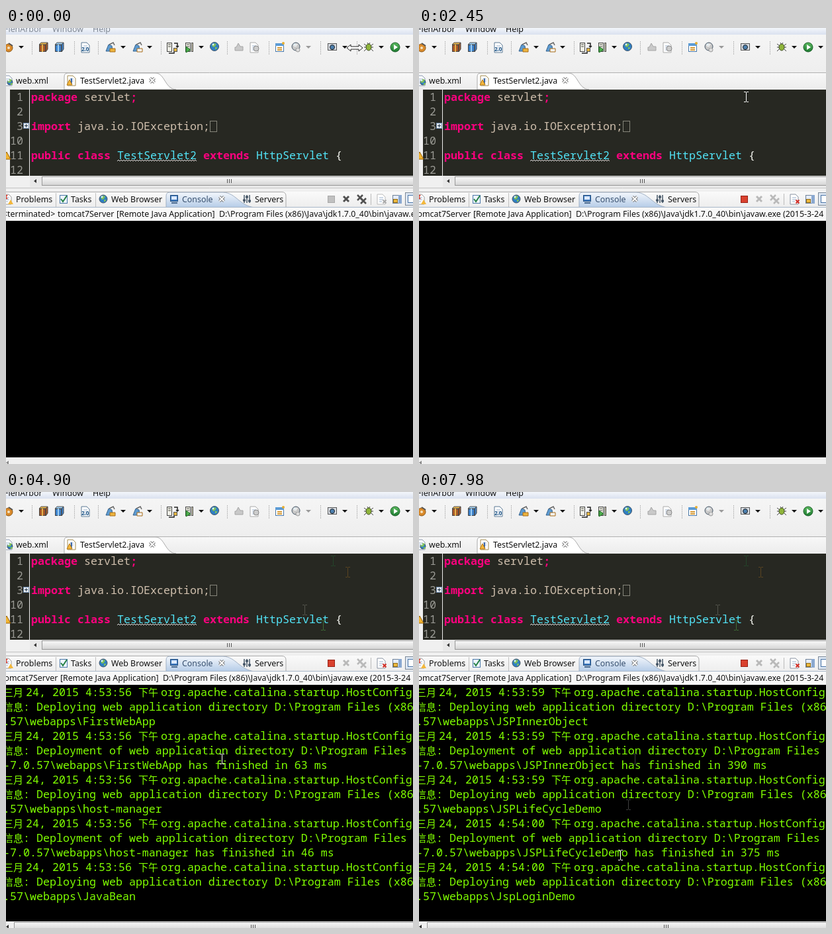
Animation of 615x658 px, one loop 8 s. Source, as an HTML page with a canvas:

```html
<!DOCTYPE html>
<html lang="en">
<head>
<meta charset="utf-8">
<title>IDE server start</title>
<style>
  html, body { margin: 0; width: 100%; height: 100%; overflow: hidden; background: #f0f0f0; }
  canvas { display: block; }
</style>
</head>
<body>
<canvas id="stage" width="615" height="658"></canvas>
<script>
const g = document.getElementById('stage').getContext('2d');
const LOOP = 8000, TICK = 70, ROW = 22;
const UI = '12.4px "Noto Sans", "Open Sans", sans-serif';
const MONO = '16.667px "Noto Sans Mono", "DejaVu Sans Mono", monospace';
const CJK = '15px "Noto Sans CJK SC", "Noto Sans CJK", sans-serif';
const GREEN = '#80ff00';

// drawing helpers
function text(s, x, y, color = '#111', font = UI) {
  g.font = font;
  g.fillStyle = color;
  g.fillText(s, x, y);
}
function box(x, y, w, h, fill, stroke) {
  if (fill) { g.fillStyle = fill; g.fillRect(x, y, w, h); }
  if (stroke) { g.strokeStyle = stroke; g.lineWidth = 1; g.strokeRect(x + .5, y + .5, w - 1, h - 1); }
}
function path(d, fill, stroke, width = 1) {
  const p = new Path2D(d);
  if (fill) { g.fillStyle = fill; g.fill(p); }
  if (stroke) { g.strokeStyle = stroke; g.lineWidth = width; g.stroke(p); }
}
function dot(x, y, r, fill, stroke) {
  g.beginPath();
  g.arc(x, y, r, 0, 7);
  if (fill) { g.fillStyle = fill; g.fill(); }
  if (stroke) { g.strokeStyle = stroke; g.lineWidth = 1; g.stroke(); }
}
function fade(y0, y1, ...colors) {
  const grad = g.createLinearGradient(0, y0, 0, y1);
  colors.forEach((c, i) => grad.addColorStop(i / (colors.length - 1), c));
  return grad;
}
function at(x, y, draw) {
  g.save();
  g.translate(x, y);
  draw();
  g.restore();
}

// icons, drawn around their centre
const cross = (x, y, r, color, w = 3) =>
  path(`M${x - r} ${y - r}L${x + r} ${y + r}M${x + r} ${y - r}L${x - r} ${y + r}`, null, color, w);
const drop = (x, color = '#111') => path(`M${x - 4} 27h8l-4 4z`, color);
const page = (x, y, edge = '#8a98b0') => {
  path(`M${x - 6} ${y - 7}h8l4 4v11h-12z`, '#fff', edge);
  path(`M${x - 3} ${y - 2}h6m-6 3h6m-6 3h4`, null, '#9ab0cc');
};
const globe = (x, y, r = 6, main = '#2f7fc4', land = '#7fc05a') => {
  dot(x, y, r, main, '#456');
  path(`M${x - 4} ${y - 2}l3-3 4 1-2 4-3 1zM${x + 1} ${y + 1}l3 0-1 3-2 0z`, land);
  dot(x - 2, y - 3, 1.4, '#dff0ff');
};
const parcel = (x, front, top) => {
  path(`M${x - 7} 25l3-3h10l-3 3z`, top, '#555');
  box(x - 7, 25, 10, 11, front, '#444');
  path(`M${x + 3} 25l3-3v10l-3 4z`, front, '#444');
  path(`M${x - 2} 25v11`, null, top, 2);
};
const server = (x, edge = '#444') => {
  box(x - 7, 22, 8, 14, '#f4f4e8', edge);
  path(`M${x - 5} 25h4m-4 3h4`, null, edge);
};
const deploy = (x, cap) => {
  path(`M${x - 7} 35l4-10 5 2 1 8z`, '#5e9bd1', '#36648f');
  path(`M${x - 1} 31h8v5h-8z`, cap, '#a86d18');
  path(`M${x - 2} 25l6-3 2 4`, null, '#666', 1.5);
};
const bug = (x, y) => {
  path(`M${x - 7} ${y - 5}l4 3m10-3l-4 3M${x - 7} ${y}h14M${x - 7} ${y + 6}l4-4m10 4l-4-4M${x - 2} ${y - 7}l2 3 2-3`, null, '#444');
  at(x, y, () => { g.scale(.8, 1); dot(0, 0, 5, '#8fb43b', '#33411b'); });
};

function toolbar(active, hover) {
  box(0, 0, 615, 10, fade(0, 10, '#f3f6fb', '#dae1ef'));
  box(0, 10, 615, 58, fade(10, 68, '#f5f5f5', '#eeeeee'));
  const menu = active ? '#111' : '#808894';
  text('FlenArbor', -3, 6, menu);
  text('Window', 70, 6, menu);
  text('Help', 131, 6, menu);

  for (const x of [39, 103, 139, 234, 334, 397, 475, 530])
    for (let y = 20; y < 40; y += 3) box(x, y, 1, 2, '#b5b5b5');

  if (hover) {
    box(264, 19, 39, 21, fade(19, 40, '#fff', '#e8e8e8'), '#9a9a9a');
    box(286, 20, 1, 19, '#aaa');
  }
  dot(4, 30, 6, '#d98a2b', '#8a5514');
  dot(4, 30, 2, '#f4e2c0');
  path('M4 23l6 4', null, '#555', 2);
  parcel(57, '#a7592a', '#e6b24a');
  parcel(81, '#3f83cc', '#9fd0f4');
  page(120, 29, '#5a7894');
  text('2.0', 114, 35, '#1e5688', 'bold 8px "Noto Sans", sans-serif');
  deploy(158, '#edb43e');
  deploy(199, '#f4f4f4');
  server(250);
  path('M254 23h5v6m-2-2l2 2 2-2M246 38h8v-3', null, '#222', 1.5);
  box(253, 30, 6, 6, '#e4b440', '#555');
  server(278);
  path('M272 28l7 5-7 4z', '#4cad4c', '#1f6a24');
  box(280, 22, 3, 14, '#d9d4b8', '#555');
  globe(315, 28, 6.5);
  path('M346 34h12v-6h-4l-3-5-3 6h-2z', '#c9c9c9', '#a5a5a5');
  page(375, 29, '#aaa');
  dot(378, 31, 4, '#ccc', '#888');
  box(407, 23, 13, 13, '#fff', '#4a78a8');
  box(407, 23, 13, 4, '#5b9bd5');
  path('M410 30h7m-7 3h7', null, '#d69a35', 2);
  dot(419, 23, 2, '#e6ad32');
  globe(438, 28, 6, '#c6c6c6', '#e6e6e6');
  dot(441, 33, 3, '#ddd', '#999');
  box(486, 23, 14, 11, '#d8dde4', '#555');
  dot(493, 29, 3.5, '#4c7fae', '#222');
  bug(548, 29);
  dot(588, 29, 7, fade(22, 36, '#5cba60', '#1c7a30'), '#175c25');
  path('M586 25l6 4-6 4z', '#fff');
  for (const x of [23, 177, 217, 295, 512, 567, 607]) drop(x);
  drop(457, '#999');
}

function editor() {
  box(0, 67, 615, 26, fade(67, 93, '#f8f8f8', '#ececec'));
  path('M0 67.5H615', null, '#b0b0b0');
  path('M88 93V74q0-6 5-6H226C240 68 240 92 257 93z', '#fff', '#a8a8a8');
  page(3, 79);
  globe(6, 82, 4);
  text('web.xml', 15, 84);
  page(99, 79, '#a38b4f');
  text('J', 97, 84, '#1d4f9a', 'bold 11px "Noto Sans", sans-serif');
  path('M92 86l4-8 4 8z', '#f5b83c', '#b77a12');
  text('TestServlet2.java', 112, 84);
  closeMark(221, 79);

  box(0, 93, 615, 130, '#272822');
  box(0, 93, 6, 130, '#f0f0f0');
  box(35, 93, 1, 130, '#eee');
  const pink = '#ff007f', plain = '#cfbfad', cyan = '#52e3f6';
  const code = (row, parts) => {
    let col = 0;
    for (const [s, color] of parts) {
      text(s, 38 + col * 10, 110 + row * ROW, color, (color === pink ? 'bold ' : '') + MONO);
      col += s.length;
    }
  };
  ['1', '2', '3', '10', '11', '12'].forEach((n, i) =>
    text(n, 26 - n.length * 10, 110 + i * ROW, '#9a9a94', MONO));
  code(0, [['package', pink], [' servlet', plain], [';', pink]]);
  code(2, [['import', pink], [' java.io.IOException;', plain]]);
  code(4, [['public class ', pink], ['TestServlet2', cyan], [' ', plain], ['extends ', pink], ['HttpServlet', cyan], [' {', '#f9faf4']]);
  path('M168 201' + 'l2-2l2 2'.repeat(30), null, '#ddd');
  box(308, 140, 11, 17, null, '#85857a');
  box(26, 143, 9, 9, '#e8f0fa', '#6a86a8');
  path('M28 147.5h5m-2.5-2.5v5', null, '#234');
  path('M-5 198l6-11 6 11z', '#f2b431', '#946310');

  box(0, 223, 615, 24, '#f0f0f0');
  box(36, 223, 579, 17, '#e8e8e8');
  path('M46 228v6l-4-3z', '#333');
  box(54, 224, 570, 14, fade(224, 238, '#fafafa', '#e7e7e7', '#d2d2d2'), '#999');
  grip(337, 228, 6);
  path('M0 241.5H615', null, '#c2c2c2');
}
const grip = (x, y, h) => { for (const d of [-3, 0, 3]) box(x + d, y, 1, h, '#555'); };
const closeMark = (x, y) => {
  cross(x, y, 3.5, '#777', 4);
  cross(x, y, 3.5, '#fff', 2);
};

function consoleHead(titleLive, iconsLive) {
  box(0, 247, 615, 24, fade(247, 271, '#fafafa', '#ededed'));
  path('M0 247.5H417q6 0 6 6V270', null, '#aaa');
  path('M75.5 249V270M135.5 249V270', null, '#c0c0c0');
  path('M242 271V254q0-6 5-6H328C348 249 352 268 376 271z', fade(248, 271, '#f3f7fc', '#b4cbe7'), '#a0b0c4');
  path('M0 270.5H615', null, '#a9b8ca');

  page(2, 258, '#999');
  cross(-1, 255, 3, '#d64235', 2);
  path('M3 266l4-7 4 7z', '#f3b83b');
  text('Problems', 15, 263);
  box(81, 252, 12, 13, '#eef5ff', '#4c79aa');
  path('M83 258l3 4 6-9', null, '#258045', 2);
  text('Tasks', 98, 263);
  globe(147, 258);
  text('Web Browser', 159, 263);
  box(248, 252, 12, 10, '#3d78bd', '#27517f');
  box(250, 254, 8, 5, '#dceaff');
  box(250, 263, 9, 2, '#49698e');
  text('Console', 266, 263, '#38506f');
  closeMark(326, 258);
  path('M360 252v12m4-12v12m4-12v12', null, '#456', 1.5);
  path('M358 260h4m0-5h4m0 6h4', null, '#456', 3);
  text('Servers', 376, 263);

  const dark = iconsLive ? '#b9b9b9' : '#505050';
  box(486, 253, 11, 11, iconsLive ? '#d9412e' : '#c0c0c0', iconsLive ? '#972216' : '#a8a8a8');
  cross(514, 258, 4, dark);
  cross(535, 256, 4, dark, 2.5);
  cross(540, 261, 4, dark, 2.5);
  box(551, 250, 1, 17, '#bbb');
  page(567, 258, iconsLive ? '#8b94a3' : '#bbb');
  cross(572, 262, 2.5, iconsLive ? '#d33028' : '#aaa', 2);
  box(584, 252, 14, 13, '#e6edf8', '#6f8299');
  box(593, 252, 5, 13, '#8aa8d0');
  box(585, 258, 7, 6, '#edb93d', '#8f6b1a');
  box(603, 248, 20, 20, '#dce6f2', '#7b8796');
  box(607, 252, 12, 12, '#fff', '#4873a6');

  box(0, 271, 615, 20, '#f8f8f8');
  const x = titleLive ? -7 : 78;
  if (!titleLive) text('<terminated>', -5, 285);
  text('tomcat7Server', x, 285);
  text('[Remote Java Application]', x + 89, 285);
  text('D:\\Program Files (x86)\\Java\\jdk1.7.0_40\\bin\\javaw.exe (2015-3-24 下午4:53:53)', x + 244, 285);
}

// console log: { time, from } is a header row, { info } a message, a string a wrapped rest
const head = (time, from) => ({ time, from });
const info = s => ({ info: s });
const tomcat = 'org.apache.catalina.', host = tomcat + 'startup.HostConfig deployDirectory';
const folder = 'web application directory D:\\Program Files (x86)\\apache-tomcat';
const start = (time, app) => [head(time, host), info(`Deploying ${folder}-7.0`), `.57\\webapps\\${app}`];
const done = (time, app, ms) =>
  [head(time, host), info(`Deployment of ${folder}`), `-7.0.57\\webapps\\${app} has finished in ${ms} ms`];
const protocol = name =>
  [head('53:54', 'org.apache.coyote.AbstractProtocol init'), info(`Initializing ProtocolHandler ["${name}"]`)];
const log = [
  head('53:54', tomcat + 'core.AprLifecycleListener init'),
  info('The APR based Apache Tomcat Native library which allows optimal performance '),
  'in production environments was not found on the java.library.path: D:\\Program Fi',
  'les (x86)\\Java\\jdk1.7.0_40\\bin;D:\\Program Files (x86)\\apache-tomcat-7.0.57\\bin',
  ...protocol('http-bio-8080'), ...protocol('ajp-bio-8009'),
  head('53:54', tomcat + 'startup.Catalina load'), info('Initialization processed in 605 ms'),
  head('53:54', tomcat + 'core.StandardService startInternal'), info('Starting service Catalina'),
  head('53:54', tomcat + 'core.StandardEngine startInternal'), info('Starting Servlet Engine: Apache Tomcat/7.0.57'),
  ...start('53:55', 'CookieDemo'), ...done('53:55', 'CookieDemo', 406),
  ...start('53:55', 'docs'), ...done('53:55', 'docs', 47),
  ...start('53:55', 'examples'), ...done('53:56', 'examples', 328),
  ...start('53:56', 'FirstWebApp'), ...done('53:56', 'FirstWebApp', 63),
  ...start('53:56', 'host-manager'), ...done('53:56', 'host-manager', 46),
  ...start('53:56', 'JavaBean'),
  head('53:57', 'com.sun.faces.config.ConfigureListener contextInitialized'),
  info("Initializing Sun's JavaServer Faces implementation (1.2_04-b20-p03) for cont"),
  "ext '/JavaBean'",
  head('53:58', 'com.sun.faces.spi.InjectionProviderFactory createInstance'),
  info('JSF1048: PostConstruct/PreDestroy annotations present.  ManagedBeans methods'),
  ' marked with these annotations will have said annotations processed.',
  ...done('53:58', 'JavaBean', 2246),
  ...start('53:59', 'JSPInnerObject'), ...done('53:59', 'JSPInnerObject', 390),
  ...start('53:59', 'JSPLifeCycleDemo'), ...done('54:00', 'JSPLifeCycleDemo', 375),
  ...start('54:00', 'JspLoginDemo')
];

// [time, first visible row, rows printed]; scrolling lags one tick behind printing
const prints = [
  [0, 0, 0], [3430, 0, 4], [3570, 0, 8], [3710, 0, 12], [3850, 0, 17], [3920, 2, 17],
  [4060, 2, 23], [4130, 8, 23], [4340, 8, 29], [4410, 14, 29], [4830, 14, 47], [4900, 32, 47],
  [5670, 32, 50], [5740, 35, 50], [6160, 35, 53], [6230, 38, 53], [6510, 44, 59],
  [6860, 44, 65], [6930, 50, 65], [7210, 50, 68], [7280, 53, 68], [7560, 53, 71], [7630, 56, 71]
];

function consoleBody(t) {
  const [, top, count] = prints.filter(p => p[0] <= t).pop();
  box(0, 291, 615, 357, '#000');
  g.save();
  g.beginPath();
  g.rect(0, 291, 615, 357);
  g.clip();
  log.slice(top, Math.min(count, top + 17)).forEach((row, i) => {
    const y = 308 + i * ROW;
    const mono = (s, x) => text(s, x, y, GREEN, MONO);
    const han = (s, x) => text(s, x, y, GREEN, CJK);
    if (row.time) {
      han('三月', -4);
      mono('24, 2015 4:' + row.time, 30);
      han('下午', 200);
      mono(row.from, 234);
    } else if (row.info) {
      han('信息', -4);
      mono(': ' + row.info, 26);
    } else mono(row, -4);
  });
  g.restore();

  box(0, 648, 615, 10, '#f0f0f0');
  path('M4 653v6l-4-3z', count ? '#333' : '#888');
  if (count) {
    box(12, 649, 610, 14, fade(649, 663, '#fafafa', '#e4e4e4', '#d0d0d0'), '#999');
    grip(373, 653, 5);
  }
}

// menus
function panel(x, y, w, h) {
  box(x + 3, y + 3, w, h, 'rgba(0,0,0,.35)');
  box(x, y, w, h, '#f1f1f1', '#979797');
  box(x + 27, y + 2, 1, h - 4, '#dcdcdc');
}
const glow = (x, y, w) => box(x, y, w, 21, fade(y, y + 21, '#edf4fc', '#d3e5f8'), '#a9cbee');

function menus(t) {
  if (t < 1120 || t >= 2170) return;
  g.save();
  g.globalAlpha = t < 1190 ? .4 : 1;
  panel(264, 43, 213, 128);
  if (t >= 1470) glow(267, 88, 207);
  const off = '#a3a3a3', on = '#111';
  [['FlenArbor Bromy', 54, off], ['FlenArbor Lorvet', 76, off], ['Lorvet  7.x', 98, on]].forEach(([s, y, color]) => {
    text(s, 299, y + 4, color);
    path(`M461 ${y - 4}v7l4-3.5z`, color);
    dot(278, y, 5.5, color === on ? '#c99a45' : '#c4c4c4');
  });
  box(293, 112, 181, 1, '#d0d0d0');
  box(293, 143, 181, 1, '#d0d0d0');
  text('Configure Server', 299, 132);
  text('Manage Deployments...', 299, 162);
  at(0, 99, () => { server(279); dot(282, 25, 3, '#e0a43b'); });
  at(0, 129, () => { server(277); box(280, 30, 6, 6, '#e4b440', '#555'); });
  if (t >= 1680) {
    panel(475, 87, 112, 48);
    if (t >= 1890) glow(478, 89, 106);
    text('Start', 509, 104);
    text('Stop', 509, 126, off);
    path('M485 95l8 5-8 5z', '#3fa34b');
  }
  g.restore();
}

// pointer
const moves = [
  [70, 527, 30], [420, 440, 46], [700, 340, 44], [910, 297, 28], [1190, 297, 28], [1540, 380, 100],
  [1890, 479, 104], [2030, 492, 103], [2100, 492, 103], [2170, 494, 104], [2940, 494, 104],
  [3220, 451, 178], [3780, 305, 447], [4060, 305, 447], [4480, 326, 403], [7490, 326, 403],
  [7770, 316, 472], [7980, 304, 548]
];
function pointerAt(t) {
  const next = moves.findIndex(m => m[0] >= t);
  if (next < 1) return moves[0].slice(1);
  const [t0, x0, y0] = moves[next - 1], [t1, x1, y1] = moves[next];
  const k = (t - t0) / (t1 - t0);
  return [Math.round(x0 + (x1 - x0) * k), Math.round(y0 + (y1 - y0) * k)];
}
const beam = (x, y, color) =>
  path(`M${x - 3} ${y - 7.5}h3m1 0h3M${x + .5} ${y - 7}v14M${x - 3} ${y + 7.5}h3m1 0h3`, null, color);

function pointer(t) {
  // faint marks the pointer leaves behind
  const marks = [[3850, 451, 178, '#54554c'], [3850, 479, 201, '#3d6b35'], [3850, 494, 104, '#24452a'],
    [3850, 516, 121, '#5a4420'], [7630, 326, 403, '#3c3c3c'], [7840, 316, 472, '#3c3c3c']];
  for (const [from, x, y, color] of marks) if (t >= from) beam(x, y, color);

  const [x, y] = pointerAt(t);
  if (t < 140) {
    at(x, y, () => path('M-12 0l6-5v3h12v-3l6 5-6 5v-3h-12v3z', '#fff', '#222'));
  } else if (t < 2170 || (y > 222 && y < 291)) {
    at(x, y, () => path('M.5 .5v16l4-4 3 6.500 2.500-1-3-6.500h5z', '#fff', '#111'));
  } else beam(x, y, '#fff');
}

function render(t) {
  const hover = t >= 140 && t < 1330 && pointerAt(t)[0] < 304;
  toolbar(t >= 1120, hover);
  editor();
  consoleHead(t >= 2310, t >= 2380);
  consoleBody(t);
  menus(t);
  pointer(t);
}

let shown = -1;
function frame() {
  const t = Math.floor(performance.now() % LOOP / TICK) * TICK;
  if (t !== shown) render(shown = t);
  requestAnimationFrame(frame);
}
frame();
</script>
</body>
</html>
```
